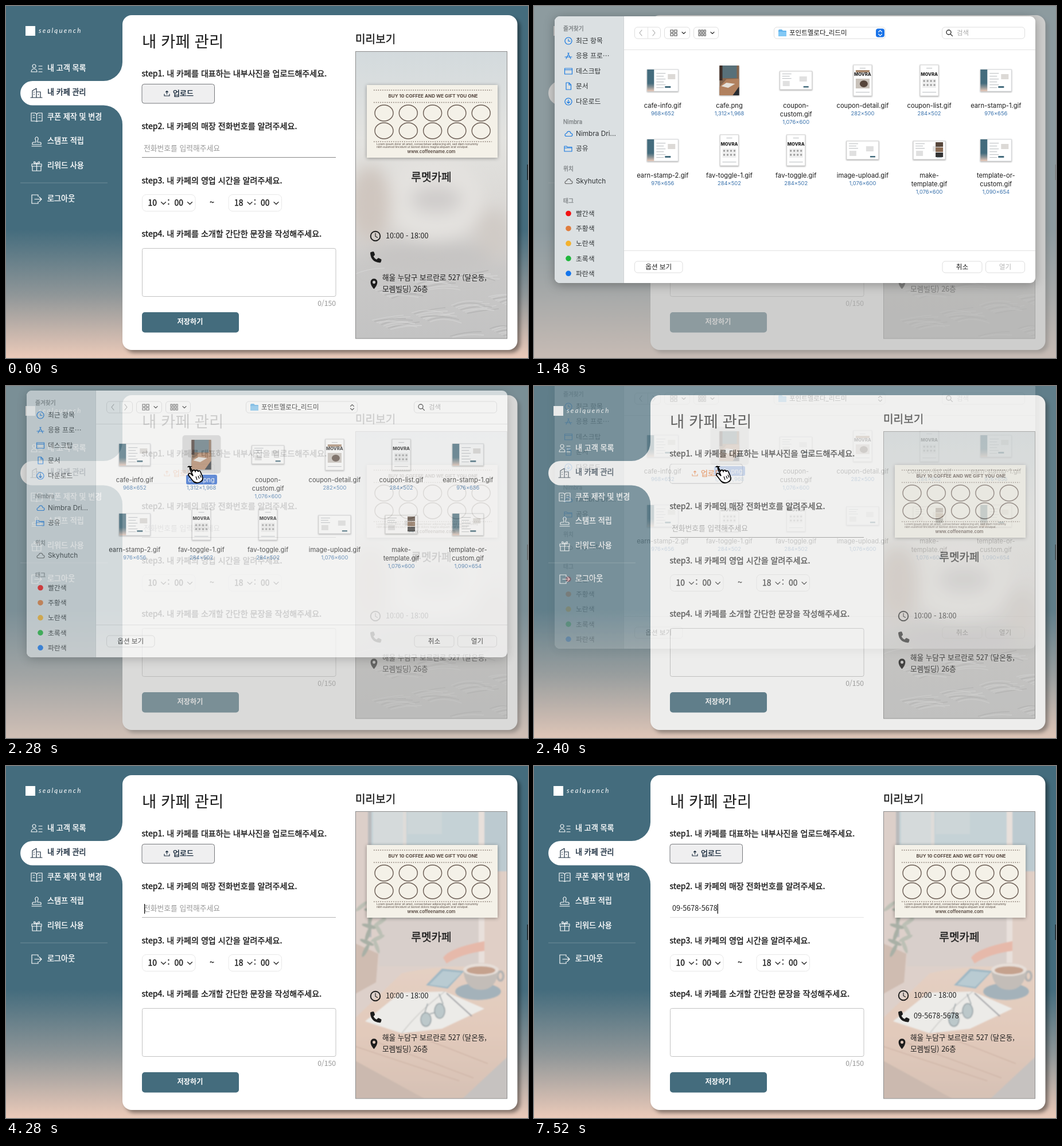
An HTML page for the animation above (8 s loop, 910x615 px).

```html
<!DOCTYPE html>
<html lang="ko">
<head>
<meta charset="utf-8">
<title>카페 관리</title>
<style>
html, body { margin: 0; width: 100%; height: 100%; overflow: hidden; background: #446c7d }
svg { display: block; width: 910px; height: 615px; font-family: "Noto Sans CJK KR", "Noto Sans CJK", sans-serif; fill: #1c1c1c }
.line { fill: none; stroke: currentColor; stroke-width: 1.15; stroke-linecap: round; stroke-linejoin: round }
.latin { font-family: Inter, "Noto Sans CJK KR", "Noto Sans CJK", sans-serif }
.panel { filter: drop-shadow(5px 5px 3px rgba(0, 0, 0, .4)) }
.card { filter: drop-shadow(0 1px 3px rgba(0, 0, 0, .35)) }
.sheet { filter: drop-shadow(0 3px 9px rgba(0, 0, 0, .3)) }
.thumb { filter: drop-shadow(0 1px 1px rgba(0, 0, 0, .35)) }
</style>
</head>
<body>
<svg id="stage" viewBox="0 0 910 615"></svg>
<script>
const INK = '#1c1c1c', MID = 'text-anchor="middle"';
const text = (x, y, s, size, attrs = '') => `<text x="${x}" y="${y}" font-size="${size}" ${attrs}>${s}</text>`;
// Medium weight: regular glyphs with a hairline outline
const medium = (x, y, s, size, color = INK, attrs = '') => text(x, y, s, size, `fill="${color}" stroke="${color}" stroke-width=".4" ${attrs}`);
const rect = (x, y, w, h, attrs = '') => `<rect x="${x}" y="${y}" width="${w}" height="${h}" ${attrs}/>`;
const path = (d, attrs = '') => `<path d="${d}" ${attrs}/>`;
const circle = (x, y, r, attrs = '') => `<circle cx="${x}" cy="${y}" r="${r}" ${attrs}/>`;
const ellipse = (x, y, rx, ry, attrs = '') => `<ellipse cx="${x}" cy="${y}" rx="${rx}" ry="${ry}" ${attrs}/>`;
const line = (d, color = INK, attrs = '') => path(d, `class="line" color="${color}" ${attrs}`);
const group = (attrs, ...parts) => `<g ${attrs}>${parts.join('')}</g>`;
const repeat = (n, make) => Array.from({ length: n }, (_, i) => make(i)).join('');

const defs = `<defs>
  <linearGradient id="sky" x2="0" y2="1"><stop offset=".635" stop-color="#446c7d"/><stop offset=".82" stop-color="#8f9698"/><stop offset="1" stop-color="#ebcab9"/></linearGradient>
  <linearGradient id="fog" x2="0" y2="1"><stop stop-color="#d3dadd"/><stop offset=".3" stop-color="#e3e3e0"/><stop offset=".6" stop-color="#d9d6d3"/><stop offset=".75" stop-color="#c9c8c7"/><stop offset="1" stop-color="#c3c3c3"/></linearGradient>
  <linearGradient id="wood" x2="0" y2="1"><stop stop-color="#e4d0c3"/><stop offset=".5" stop-color="#e2cabb"/><stop offset="1" stop-color="#d6c1b5"/></linearGradient>
  <filter id="soft" x="-50%" y="-50%" width="200%" height="200%"><feGaussianBlur stdDeviation="14"/></filter>
  <filter id="blur"><feGaussianBlur stdDeviation="1"/></filter>
  <clipPath id="frame">${rect(609, 79, 265, 502)}</clipPath>
</defs>`;

// Sidebar
const menu = [
  [108, '내 고객 목록', 'M1 15c0-7 10-7 10 0zM6 8a3 3 0 1 1 .1 0M14 5h6M14 10h6M14 15h6'],
  [150, '내 카페 관리', 'M0 18h20M3 18V6l7-4v16M10 8h7v10M6 8v1M6 12v1M13.5 12v1'],
  [193, '쿠폰 제작 및 변경', 'M1 2h7l2.5 2L13 2h7v14h-7l-2.5 1L8 16H1zM10.5 4v13M4 6h3M4 10h3M14 6h3M14 10h3'],
  [235, '스탬프 적립', 'M2 18h17M3 15h15v-3q0-1-2-1h-4c-1-3 2-5 1-7-1-3-4-3-5 0-1 2 2 4 1 7H5q-2 0-2 1z'],
  [278, '리워드 사용', 'M2 6h17v4H2zM3 10h15v8H3zM10.5 6v12M10.5 6c-8 0-5-9 0 0 5-9 8 0 0 0'],
  [336, '로그아웃', 'M13 5V2H2v15h11v-3M7 9.5h12m-4-4 4 4-4 4'],
];
const sidebar = path('M203 98A33 33 0 0 1 170 131H46.3a21.25 21.25 0 0 0 0 42.5H170A33 33 0 0 1 203 207z', 'fill="#fff"')
  + rect(34, 35, 17, 17, 'fill="#fff"')
  + text(57, 47, 'sealquench', 11.5, 'font-family="Lato, sans-serif" font-style="italic" letter-spacing="2.2" fill="#fff"')
  + menu.map(([y, label, icon], i) => {
    const color = i === 1 ? '#16283a' : '#fff';
    return line(icon, color, `transform="translate(43 ${y - 8})"`) + medium(72, y + 4.8, label, 13.1, color);
  }).join('')
  + rect(25, 308.5, 152, 1, 'fill="#fff" opacity=".22"');

// Form
const stepLabel = (y, s) => medium(236.5, y, s, 14.1);
const timeSelect = (x, hour) => rect(x, 329.5, 92.5, 29, 'rx="7" fill="#fff" stroke="#e8e8e8"')
  + medium(x + 10, 349, hour, 13.9) + medium(x + 44, 348, ':', 13.9) + medium(x + 56, 349, '00', 13.9)
  + [37, 83].map(dx => line(`M${x + dx - 4} 342.5l4 4 4-4`)).join('');
const uploadButton = (fill, stroke, color) => rect(237, 136.5, 126.5, 33.5, `rx="4" fill="${fill}" stroke="${stroke}"`)
  + line('M276 154v3h9v-3M280.5 154v-5.500m-2 2 2-2 2 2', color, 'stroke-width="1"') + medium(291, 156.5, '업로드', 13, color);

const form = text(237, 72.3, '내 카페 관리', 27.6)
  + stepLabel(123, 'step1. 내 카페를 대표하는 내부사진을 업로드해주세요.')
  + uploadButton('#efeff0', '#77797c', '#16283a')
  + group('id="hover"', uploadButton('#fff', '#ddd', '#f0894a'))
  + stepLabel(215, 'step2. 내 카페의 매장 전화번호를 알려주세요.')
  + text(240, 253, '전화번호를 입력해주세요', 12.8, 'id="hint" fill="#999"')
  + text(241, 253, '', 12.6, 'id="phone"') + rect(0, 241, 1.2, 17, 'id="caret" fill="#000"')
  + rect(237, 264, 338, 1, 'fill="#e4e4e4"') + rect(237, 264, 338, 1, 'id="underline" fill="#858585"')
  + stepLabel(309.7, 'step3. 내 카페의 영업 시간을 알려주세요.')
  + timeSelect(237.5, '10') + medium(359, 348, '~', 13.9, INK, MID) + timeSelect(388, '18')
  + stepLabel(403.3, 'step4. 내 카페를 소개할 간단한 문장을 작성해주세요.')
  + rect(237.5, 423.5, 337.5, 84, 'rx="3" fill="#fff" stroke="#c2c2c2"')
  + text(575, 524, '0/150', 12.2, 'text-anchor="end" fill="#949494"')
  + rect(237, 535, 169, 35.5, 'rx="5" fill="#446c7d"')
  + text(321, 556, '저장하기', 12.2, `${MID} font-weight="700" fill="#fff"`);

// Preview photographs
const furStrand = i => {
  const x = 605 + (i * 67) % 270, y = 470 + (i * 41) % 110, tone = ['#e2e2e2', '#adadad', '#d6d6d6'][i % 3];
  return path(`M${x} ${y}q25 ${-12 + i % 9} 55 ${(i * 7) % 15 - 12}`, `fill="none" stroke="${tone}" stroke-width="${.8 + i % 3 * .5}"`);
};
const foggyPhoto = rect(609, 79, 265, 502, 'fill="url(#fog)"')
  + group('filter="url(#soft)"',
    ellipse(745, 335, 85, 75, 'fill="#e4e2df"'), ellipse(635, 345, 36, 65, 'fill="#cfc6bf"'),
    ellipse(750, 338, 45, 24, 'fill="#cfcccb"'), ellipse(850, 400, 30, 45, 'fill="#d0cbc6"'), ellipse(740, 440, 110, 25, 'fill="#c6c4c3"'))
  + group('opacity=".65"', repeat(70, furStrand));

const leaf = i => {
  const x = 620 + (i * 17) % 36, y = 245 + i * 7;
  return ellipse(x, y, 13, 3.5, `fill="${i % 2 ? '#a9b0a6' : '#bcc0b5'}" transform="rotate(${i * 47 - 40} ${x} ${y})"`);
};
const cafePhoto = rect(609, 79, 265, 502, 'fill="#ddd0ca"')
  + group('filter="url(#blur)"',
    path('M636 79H832V265H636z', 'fill="#c5d2d6"'), path('M640 79h52v58h-52z', 'fill="#d5dadb"'),
    path('M700 79h60v40h-60z', 'fill="#cdd6d8"'), path('M692 79h6v186h-6z', 'fill="#dfdcd9"'),
    path('M832 79h42v105h-42z', 'fill="#bccad0"'), path('M834 184h40v180h-40z', 'fill="#e0cfc6"'),
    path('M824 79h10v265h-10z', 'fill="#e8e0db"'),
    path('M609 79h22v230h-22z', 'fill="#dccfc9"'), path('M631 79h6v220h-6z', 'fill="#b9babb"'),
    path('M650 265h174v85H650z', 'fill="#d8cfcb"'),
    path('M609 310l40 18-4 50-36 20z', 'fill="#cfbcb1"'), repeat(12, leaf),
    path('M762 335q10-17 72-29v17q-40 5-66 22z', 'fill="#e6b9aa"'),
    path('M609 440 690 362q90-20 184-5v224H609z', 'fill="url(#wood)"'),
    path('M609 515l120 66H609z', 'fill="#cbb9af"'), path('M796 581 874 508v73z', 'fill="#c6c2c0"'),
    path('M609 490 790 550M640 480l175 65M700 465l140 55', 'fill="none" stroke="#cfb5a7" stroke-width="1.5"'),
    path('M732 383l28-29 39 4-29 31z', 'fill="#9fb8c4"'), path('M738 382l24-24 32 3-25 25z', 'fill="#b9cbd2"'),
    ellipse(823, 394, 40, 15, 'fill="#a4b2ba"'), ellipse(862, 367, 5, 8, 'fill="none" stroke="#b4b3b2" stroke-width="4"'),
    path('M797 356q3 35 31 35 27 0 31-35z', 'fill="#c3bdb8"'), ellipse(828, 356, 31, 11, 'fill="#e6ded8"'), ellipse(828, 357, 25, 7, 'fill="#c5a28e"'),
    path('M626 446 688 396 765 394 834 424 760 459 690 467z', 'fill="#ecebe8"'),
    path('M690 467Q718 430 765 394', 'fill="none" stroke="#c8c7c5" stroke-width="1.5"'), path('M768 397l44 40', 'stroke="#9a9ba0" stroke-width="2"'),
    group('fill="#bcc8ca" stroke="#8f9a9f" stroke-width="1.5"', ellipse(732, 443, 9, 12), ellipse(756, 428, 9, 13), path('M739 433l8-2M730 431l5-16M762 416l-7-18', 'fill="none"')));

// Coupon card and shop details
const dots = y => path(`M641 ${y}H847`, 'stroke="#84776d" stroke-width="1.6" stroke-dasharray="1.6 2.2"');
const brown = 'fill="#54463e"';
const coupon = group('class="latin"',
  rect(629, 138, 228, 127, 'class="card" fill="#f4f1e8"'), dots(147), dots(168.5), dots(237),
  text(744.5, 160, 'BUY 10 COFFEE AND WE GIFT YOU ONE', 8.1, `${MID} font-weight="700" ${brown}`),
  repeat(10, i => ellipse(659 + i % 5 * 42.3, i < 5 ? 187 : 218, 16, 14, 'fill="none" stroke="#6b5d54" stroke-width="1.4"')),
  text(646, 243.3, 'Lorem ipsum dolor sit amet, consectetuer adipiscing elit, sed diam nonummy', 4.9, brown),
  text(646, 248.3, 'nibh euismod tincidunt ut laoreet dolore magna aliquam erat volutpat.', 4.9, brown),
  text(741.5, 257, 'www.coffeename.com', 7.7, `${MID} font-weight="600" ${brown}`));

const preview = medium(609, 65.2, '미리보기', 19.1)
  + group('clip-path="url(#frame)"', foggyPhoto, group('id="cafe"', cafePhoto))
  + rect(609.5, 79.5, 264, 501.5, 'fill="none" stroke="#8c8c8c"') + coupon
  + medium(741.5, 306, '루멧카페', 19.1, INK, MID)
  + group('id="contact"',
    circle(644, 402, 8.3, 'fill="none" stroke="#1c1c1c" stroke-width="1.9"'), line('M644 397v5.5l3.5 2', INK, 'stroke-width="1.7"'),
    text(662, 405.8, '10:00 - 18:00', 12.6),
    path('M636 430l4-1q1 0 1.5 1l1.5 4q0 1-.5 1.5l-2 2q2 4 5.5 5.5l2-2q1-1 2-.5l4 2q.8.5.5 1.500l-1 3.500q-.5 1-1.500 1-16-1-17-17 0-1 1-1.500z'),
    text(662, 442, '', 12.6, 'id="phoneCopy"'))
  + path('M641.5 494.5c-9-10-6.5-18 0-18s9 8 0 18zm0-14.500a2.600 2.600 0 1 0 .1 0z', 'fill-rule="evenodd"')
  + text(656, 479, '해울 누담구 보르란로 527 (달온동,', 12.6) + text(656, 499, '모렘빌딩) 26층', 12.6);

// File dialog
const CLOUD = 'M3 10.5c-5 0-3-5 0-5 1-5 7-4 7 0 4 0 4 5 0 5z';
const places = [
  [39, '즐겨찾기'], [61, '최근 항목', 'M6 0a6 6 0 1 1-.1 0M6 3v3.5h3'], [87, '응용 프로⋯', 'M2 11 7 1M5 1l5 10M0 8h12'],
  [114, '데스크탑', 'M-.5 1h13v10h-13zM0 3.5h12'], [140, '문서', 'M2 0h5l3.5 3.5V12H2zM7 0v4h3'], [167, '다운로드', 'M6 0a6 6 0 1 1-.1 0M6 3v6M3.5 6.5 6 9l2.5-2.5'],
  [202, 'Nimbra'], [223, 'Nimbra Dri...', CLOUD], [249, '공유', 'M-1 2h4l1 1.5h8V11H-1zM-1 5h13'],
  [284, '위치'], [306, 'Skyhutch', CLOUD], [340, '태그'],
];
const tags = [['빨간색', '#f21313'], ['주황색', '#df7c3d'], ['노란색', '#f4b22d'], ['초록색', '#1fb63c'], ['파란색', '#1375ec']];
const placeRow = ([y, label, icon]) => icon
  ? line(icon, label === 'Skyhutch' ? '#666' : '#1879e0', `transform="translate(54 ${y - 6})"`) + text(73, y + 4.4, label, 11.8, 'fill="#303436"')
  : medium(51, y + 3.7, label, 9.7, '#82878a');
const tagRow = ([label, color], i) => {
  const y = 362.5 + i * 26.2;
  return circle(60, y, 4.8, `fill="${color}"`) + text(73, y + 4.4, label, 11.8, 'fill="#303436"');
};

const bars = (x, y, w, n, gap) => repeat(n, i => rect(x, y + i * gap, w - i % 2 * 3, 1.2, 'fill="#c2c5c8"'));
const thumbs = {
  side: (x, y) => rect(x - 27, y - 19, 54, 38, 'fill="#fff" stroke="#d5d8da"') + rect(x - 27, y - 19, 12, 38, 'fill="url(#sky)"')
    + bars(x - 11, y - 13, 16, 6, 5) + rect(x + 9, y - 11, 13, 9, 'fill="#dcd9d6"') + rect(x + 4, y + 10, 10, 3, 'fill="#446c7d"'),
  wide: (x, y) => rect(x - 28, y - 16, 56, 32, 'fill="#fff" stroke="#cfcfcf"') + bars(x - 24, y - 12, 16, 3, 4)
    + rect(x - 23, y + 1, 12, 9, 'fill="#e0e0e0"') + rect(x + 6, y - 7, 13, 9, 'fill="#e0e0e0"') + rect(x + 13, y + 10, 9, 2.5, 'fill="#446c7d"'),
  phone: (x, y) => rect(x - 16, y - 27, 32, 54, 'fill="#fff" stroke="#d4d4d4"') + bars(x - 5, y - 22, 10, 1, 1)
    + text(x, y - 8, 'MOVRA', 7.7, `${MID} font-weight="800" fill="#222"`) + rect(x - 12, y - 3, 24, 16, 'fill="#efefef"')
    + repeat(8, i => circle(x - 9 + i % 4 * 6, y + 1 + (i >> 2) * 7, 1.7, 'fill="#9b9b9b"')) + bars(x - 12, y + 20, 24, 1, 1),
  detail: (x, y) => thumbs.phone(x, y) + rect(x - 12, y - 18, 24, 4, 'fill="#a9886d"') + rect(x - 12, y - 3, 24, 17, 'fill="#c9c2ba"') + ellipse(x + 2, y + 6, 7, 6, 'fill="#57463b"'),
  gallery: (x, y) => thumbs.wide(x, y) + repeat(3, i => rect(x + 11, y - 14 + i * 9, 13, 8, `fill="${['#57463b', '#8b6c55', '#333'][i]}"`)),
  photo: (x, y) => rect(x - 17, y - 26, 34, 52, 'fill="#85664f"') + rect(x - 14, y - 26, 27, 22, 'fill="#587079"') + rect(x - 17, y - 26, 5, 26, 'fill="#3c2d27"')
    + path(`M${x - 17} ${y + 11}l12-13 22-1v13l-11 16h-23z`, 'fill="#b1815f"') + path(`M${x - 14} ${y + 10}l9-6 15 2-12 7z`, 'fill="#e5e1da"') + path(`M${x + 6} ${y + 26}l11-15v15z`, 'fill="#252b32"'),
};
const files = [
  ['cafe-info.gif', '968×652', 'side'], ['cafe.png', '1,312×1,968', 'photo', true], ['coupon-|custom.gif', '1,076×600', 'wide'],
  ['coupon-detail.gif', '282×500', 'detail'], ['coupon-list.gif', '284×502', 'phone'], ['earn-stamp-1.gif', '976×656', 'side'],
  ['earn-stamp-2.gif', '976×656', 'side', true], ['fav-toggle-1.gif', '284×502', 'phone'], ['fav-toggle.gif', '284×502', 'phone', true],
  ['image-upload.gif', '1,076×600', 'wide'], ['make-|template.gif', '1,076×600', 'gallery'], ['template-or-|custom.gif', '1,090×654', 'side'],
];
const fileItem = ([name, size, kind, late], i) => {
  const x = 224.3 + i % 6 * 116.2, y = i < 6 ? 130 : 252, lines = name.split('|');
  return group('class="thumb"', thumbs[kind](x, y))
    + lines.map((s, n) => text(x, y + 48 + n * 15, s, 11.2, `${MID} ${kind === 'photo' ? 'id="fileName"' : ''}`)).join('')
    + text(x, y + 46.5 + lines.length * 14.7, size, 9.4, `${MID} fill="#3b73ad" ${late ? 'class="late"' : ''}`);
};
const pushButton = (x, y, w, label = '', attrs = '') => rect(x, y, w, 20, 'rx="5" fill="#fff" stroke="#dedede"')
  + text(x + w / 2, y + 14.3, label, 11.6, `${MID} ${attrs}`);
const down = x => line(`M${x} 45.5l3 3 3-3`, '#333', 'stroke-width="1.6"');
const grid = (x, n) => repeat(n * 2, i => rect(x + i % n * (12 / n + .7), 42 + Math.floor(i / n) * 6, 10 / n - .5, 4, 'fill="none" stroke="#444"'));

const dialog = rect(36, 18, 838, 466, 'class="sheet" rx="9" fill="#fff"')
  + path('M156.5 18H45a9 9 0 0 0-9 9V475a9 9 0 0 0 9 9H156.5z', 'fill="#dbe0e2"') + rect(156, 18, 1, 466, 'fill="#cfd3d5"')
  + places.map(placeRow).join('') + tags.map(tagRow).join('')
  + rect(157, 76, 717, 1, 'fill="#e2e2e2"') + rect(157, 427, 717, 1, 'fill="#e2e2e2"')
  + pushButton(175.5, 37, 45) + rect(198, 37, 1, 20, 'fill="#e2e2e2"') + line('M188 42l-4 5 4 5M207 42l4 5-4 5', '#aaa')
  + pushButton(227.5, 37, 44) + grid(238, 2) + down(258) + pushButton(278.5, 37, 43) + grid(287, 3) + down(308)
  + pushButton(418.5, 37, 194) + path('M426 43q0-2 2-2h4l2 2h5q1 0 1 1v8q0 1-1 1h-12q-1 0-1-1z', 'fill="#62b4ec"') + rect(426, 45, 14, 8, 'rx="1" fill="#82c8f5"')
  + text(445, 51, '포인트멜로다_리드미', 11.5)
  + rect(596, 39.5, 15, 15, 'id="popup" rx="4" fill="#1a73e8"') + line('M600.5 45.5l3-3 3 3M600.5 49l3 3 3-3', '#fff', 'id="popupArrows"')
  + pushButton(711.5, 37, 144) + circle(723, 46, 4, 'fill="none" stroke="#333" stroke-width="1.4"') + line('M726 49l3.5 3.5', '#333') + text(737, 51, '검색', 11.4, 'fill="#aaa"')
  + group('id="selection"', rect(307.5, 96, 67, 67, 'rx="5" fill="#d9d9d9"'), rect(314, 165, 54, 17, 'rx="3" fill="#2b68d5"'))
  + files.map(fileItem).join('')
  + pushButton(175.5, 446, 83.5, '옵션 보기') + pushButton(712, 446, 69, '취소') + pushButton(787.5, 446, 68, '열기', 'id="open"');

const hand = path('M322 141c-3 2-1 5 0 7l4 9-3-3c-3-3-7 0-4 3l7 9c3 3 5 4 9 3l3-1c5-2 6-6 4-11l-3-7c-1-3-4-2-4 0 0-3-4-4-5-1-1-3-4-3-5 0l-4-7c-1-2-2-2-3-1z', 'fill="#fff" stroke="#000" stroke-width="1.8"')
  + path('M331 158l2 6M335 157l2 5M338 155l2 5', 'stroke="#000" stroke-width="1.2"');

const stage = document.getElementById('stage');
stage.innerHTML = defs + rect(0, 0, 910, 615, 'fill="url(#sky)"')
  + rect(908.5, 277, 1.5, 27, 'fill="#1d2429"') + rect(203, 16, 688.5, 585, 'class="panel" rx="16" fill="#fff"')
  + sidebar + form + preview
  + rect(0, 0, 910, 615, 'id="dimmer" fill="#b4b4b2"') + group('id="dialog" class="latin"', dialog) + group('id="hand"', hand);

const $ = id => document.getElementById(id);
const show = (el, visible) => el.style.display = visible ? '' : 'none';
const ramp = (t, from, to) => Math.min(1, Math.max(0, (t - from) / (to - from)));
const late = stage.querySelectorAll('.late');
const PHONE = '09-5678-5678';
const KEY_TIMES = [4880, 6000, 6360, 6520, 6720, 6840, 7040, 7240, 7320, 7360, 7440, 7520];

function draw(now) {
  const t = Math.floor(now % 8000 / 40) * 40;

  const opening = ramp(t, 1200, 1480), closing = ramp(t, 2200, 2520);
  const alpha = Math.min(1, opening * 1.6) * Math.max(0, 1 - closing * 1.3);
  show($('dialog'), alpha > 0);
  $('dialog').style.opacity = alpha;
  $('dialog').setAttribute('transform', `translate(0 ${-40 * (1 - opening + closing)})`);
  $('dimmer').style.opacity = .65 * opening * (1 - closing);
  late.forEach(el => show(el, t >= 1360));

  const selected = t >= 1800;
  show($('selection'), selected);
  $('fileName').style.fill = selected ? '#fff' : '';
  $('open').style.fill = selected ? '' : '#b5b5b5';
  show($('popup'), closing === 0);
  $('popupArrows').style.color = closing ? '#333' : '#fff';
  show($('hand'), t >= 2200 && t < 2480);

  $('hover').style.opacity = ramp(t, 0, 160) * (1 - ramp(t, 2400, 2520));
  $('cafe').style.opacity = ramp(t, 2720, 2840);

  const typed = PHONE.slice(0, KEY_TIMES.filter(time => t >= time).length);
  $('phone').textContent = $('phoneCopy').textContent = typed;
  show($('hint'), !typed);
  $('underline').style.opacity = 1 - ramp(t, 4200, 4360);
  $('contact').setAttribute('transform', `translate(0 ${typed ? -1 : 0})`);
  show($('caret'), t >= 4240 && t < 4680 || t >= 4880 && t < 5520 || t >= 6000);
  $('caret').setAttribute('x', 241 + (typed ? $('phone').getComputedTextLength() : 0));
}

const start = performance.now();
function loop() {
  draw(performance.now() - start);
  requestAnimationFrame(loop);
}
loop();
</script>
</body>
</html>
```
